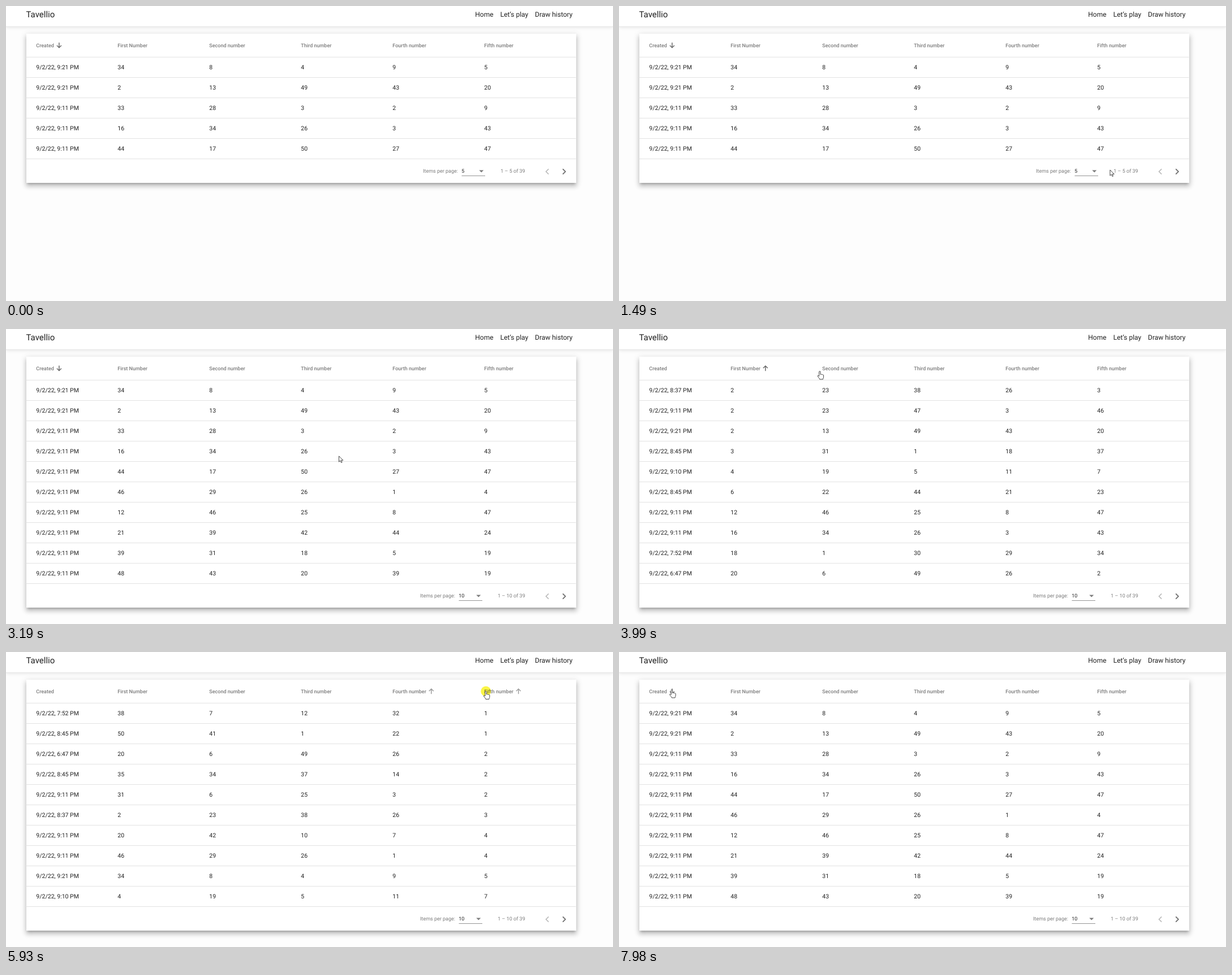
Recreate the animation shown at these times as an HTML page. Size 1073 px wide and 522 px high, loop 8 s.

```html
<!DOCTYPE html>
<html lang="en">
<head>
<meta charset="utf-8">
<title>Draw history</title>
<style>
  html, body { margin: 0; width: 100%; height: 100%; overflow: hidden; background: #fdfdfd; }
  #bar { position: absolute; inset: 0 0 auto; height: 36px; background: #fff;
    box-shadow: 0 1px 0 #e6e6e6, 0 2px 6px rgba(0,0,0,.1); }
  #card { position: absolute; left: 35.5px; top: 48.75px; width: 972px; background: #fff;
    box-shadow: 0 3.75px 3.75px -2.25px rgba(0,0,0,.2), 0 6px 7.5px .75px rgba(0,0,0,.14),
      0 2.25px 10.5px 1.5px rgba(0,0,0,.12); }
  svg { position: absolute; left: 0; top: 0; font: 10.5px Roboto, sans-serif; fill: #212121;
    text-rendering: geometricPrecision; }
  .small { font-size: 9px; }
  .muted { fill: #7c7c7c; }
  .head { font-size: 9px; font-weight: 500; fill: #7c7c7c; }
  .sort { fill: none; stroke: #6b6b6b; stroke-width: 1.5; }
  .line { stroke: #e3e3e3; }
  .cursor { fill: #fff; stroke: #333; stroke-width: .9; stroke-linejoin: round; }
  #click { fill: #fbf547; mix-blend-mode: multiply; }
</style>
</head>
<body>
<div id="bar"></div>
<div id="card"></div>
<svg width="1073" height="522">
  <text x="35.5" y="20" font-size="15">Tavellio</text>
  <g font-size="12">
    <text x="829.3" y="19.3">Home</text>
    <text x="873.8" y="19.3">Let’s play</text>
    <text x="935" y="19.3">Draw history</text>
  </g>
  <g id="heads"></g>
  <g id="table"></g>
  <g id="pager" class="small">
    <g id="pageInfo">
      <text class="muted" x="737" y="295.3">Items per page:</text>
      <text id="size" x="805.3" y="295.3"></text>
      <path d="M805.5 300.5H847" stroke="#949494"/>
      <path d="M836.3 290.5h8l-4 4z" class="muted"/>
      <text id="range" class="muted" x="874.3" y="295.3"></text>
    </g>
    <g fill="none" stroke-width="1.75">
      <path d="M959.2 288.4l-4.6 4.6 4.6 4.6" stroke="#bdbdbd"/>
      <path d="M984.2 288.4l4.6 4.6-4.6 4.6" stroke="#6b6b6b"/>
    </g>
  </g>
  <g id="panel" class="small">
    <rect x="793.5" y="279.3" width="66" height="54" rx="3" fill="#fff"
      style="filter:drop-shadow(0 1.5px 2px rgba(0,0,0,.4))"/>
    <path d="M793.5 306.3v-24a3 3 0 0 1 3-3h60a3 3 0 0 1 3 3v24z" fill="#e0e0e0"/>
    <path id="hover" d="M793.5 306.3v24a3 3 0 0 0 3 3h60a3 3 0 0 0 3-3v-24z" fill="#f4f4f4"/>
    <text x="805.3" y="295.3" fill="#3f51b5">5</text>
    <text x="805.3" y="322.3">10</text>
  </g>
  <g id="pointer">
    <circle id="click" r="9"/>
    <path id="arrow" class="cursor" d="M0 0V10.2L2.4 8 4 11.6 5.6 10.9 4.1 7.4H7.3z"/>
    <path id="hand" class="cursor" d="M-1.3 8.5V.9a1.2 1.2 0 0 1 2.4 0V5.5c.5-.6 1.8-.5 2 .2
      .6-.5 1.7-.3 1.9.4.8-.4 1.6 0 1.6.9V10c0 1.5-1 2-1 4H-.3c0-1.8-3.3-4-3.7-6
      .3-1 1.6-.6 2.7.5z"/>
  </g>
</svg>
<script>
const $ = id => document.getElementById(id);
const LOOP = 8000, REST = 150, TRAVEL = 550, ROW = 36;

// The text of the draws by time of day, oldest first
const draws = {
  '6:47': '20 6 49 26 2',
  '7:52': '18 1 30 29 34, 28 46 8 48 47, 47 39 8 32 29, 38 7 12 32 1',
  '8:03': '49 3 8 17 39',
  '8:37': '2 23 38 26 3',
  '8:45': '3 31 1 18 37, 50 41 1 22 1, 6 22 44 21 23, 27 25 9 25 42, 35 34 37 14 2',
  '9:10': '4 19 5 11 7',
  '9:11': '2 23 47 3 46, 20 42 10 7 4, 31 6 25 3 2, 48 43 20 39 19, 39 31 18 5 19, ' +
    '21 39 42 44 24, 12 46 25 8 47, 46 29 26 1 4, 44 17 50 27 47, 16 34 26 3 43, 33 28 3 2 9',
  '9:21': '2 13 49 43 20, 34 8 4 9 5',
};
const rows = Object.entries(draws).flatMap(([time, list]) =>
  list.split(', ').map(nums => [`9/2/22, ${time} PM`, ...nums.split(' ')]));

const labels = ['Created', 'First Number', 'Second number', 'Third number', 'Fourth number', 'Fifth number'];
const colX = i => i ? 35.3 + 162 * i : 53.3;

// The pointer's stops; a press on a column head also sorts
const move = (t, x, y) => ({ t, x, y });
const press = (t, x, y) => ({ t, x, y, click: true });
const sortBy = (t, col) => ({ ...press(t, colX(col) + 3, 69.5), col });
const stops = [
  move(70, 1000, 452), move(860, 968, 292), move(1490, 868, 290),
  press(1810, 849, 286), move(2050, 849, 286), press(2810, 827.5, 320.5),
  sortBy(3740, 1), move(3990, 355, 75), sortBy(4220, 2), sortBy(4700, 3),
  sortBy(5210, 4), sortBy(5820, 5), sortBy(6800, 0),
  move(7140, 93.5, 67), { ...press(7600, 93.5, 67), col: 0 },
];
const clicks = stops.filter(s => s.click);

// Pressing the sorted column again reverses it
const sorts = [{ t: 0, col: 0, desc: true }];
for (const { t, col } of clicks) {
  if (col === undefined) continue;
  const last = sorts.at(-1);
  sorts.push({ t: t + 70, col, desc: last.col === col && !last.desc });
}

const clamp = v => Math.max(0, Math.min(1, v));
const sortAt = t => sorts.findLast(s => s.t <= t);
const text = (x, y, s, cls = '') => `<text class="${cls}" x="${x}" y="${y}">${s}</text>`;
const line = y => `<path class="line" d="M35.5 ${y}H1007.5"/>`;

function cursorAt(t) {
  const i = Math.max(0, stops.findLastIndex(s => s.t <= t));
  const a = stops[i], b = stops[i + 1] || a;
  const u = clamp((t - a.t - REST) / Math.min(TRAVEL, b.t - a.t - REST));
  const e = b === a ? 0 : u * u * (3 - 2 * u);
  return [a.x + (b.x - a.x) * e, a.y + (b.y - a.y) * e];
}

const overHead = ([x, y]) => y > 49 && y < 91 && x < 1007;
const overSelect = ([x, y]) => x > 793 && x < 860 && y > 279 && y < 334;

function arrowLevel(t, col) {
  if (sortAt(t).col === col) return 1;
  const pos = cursorAt(t);
  return overHead(pos) && labels.findLastIndex((s, i) => !i || colX(i) <= pos[0]) === col ? .54 : 0;
}

// Averaging the recent past gives a linear fade
function arrowOpacity(t, col) {
  const steps = 9;
  let sum = 0;
  for (let k = 0; k < steps; k++) sum += arrowLevel(Math.max(0, t - k * 20), col);
  return sum / steps;
}

$('heads').innerHTML = labels.map((s, i) => text(colX(i), 73, s, 'head')).join('') +
  '<path class="sort" d="M0 4.8V-4.2M-4-.3L0-4.3 4-.3"/>'.repeat(labels.length);
const arrows = [...document.querySelectorAll('.sort')];
const arrowX = [...document.querySelectorAll('.head')].map((el, i) => colX(i) + el.getComputedTextLength() + 9);

let shown = '';
function drawTable(size, { col, desc }) {
  const key = [size, col, desc].join();
  if (key === shown) return;
  shown = key;
  const list = col ? [...rows].sort((a, b) => a[col] - b[col]) : [...rows];
  if (desc) list.reverse();
  $('table').innerHTML = line(90.5) + list.slice(0, size).map((row, r) =>
    row.map((s, i) => text(colX(i), 112.2 + r * ROW, s)).join('') + line(126.5 + r * ROW)).join('');
  $('card').style.height = 84 + size * ROW + 'px';
  $('pager').setAttribute('transform', `translate(0 ${(size - 5) * ROW})`);
  $('pageInfo').setAttribute('transform', `translate(${5 - size} 0)`);
  $('size').textContent = size;
  $('range').textContent = `1 – ${size} of 39`;
}

function frame() {
  const t = performance.now() % LOOP;
  const sort = sortAt(t), pos = cursorAt(t);
  const size = t < 2950 ? 5 : 10;
  drawTable(size, sort);

  arrows.forEach((el, i) => {
    const flip = sort.col === i && sort.desc ? -1 : 1;
    el.setAttribute('transform', `translate(${arrowX[i]} 69.5) scale(1 ${flip})`);
    el.setAttribute('opacity', arrowOpacity(t, i));
  });

  const open = clamp((t - 2170) / 120);
  $('panel').setAttribute('opacity', open * clamp((3000 - t) / 100));
  $('panel').setAttribute('transform', `translate(0 ${279.3 * (1 - open) * .2}) scale(1 ${.8 + .2 * open})`);
  $('hover').setAttribute('opacity', pos[1] > 306 ? 1 : 0);

  const hand = overHead(pos) || (size === 5 && overSelect(pos));
  $('pointer').setAttribute('transform', `translate(${pos})`);
  $('pointer').setAttribute('visibility', t < stops[0].t ? 'hidden' : 'inherit');
  $('click').style.display = clicks.some(c => t >= c.t && t < c.t + 140) ? '' : 'none';
  $('hand').style.display = hand ? '' : 'none';
  $('arrow').style.display = hand ? 'none' : '';
  requestAnimationFrame(frame);
}
frame();
</script>
</body>
</html>
```
